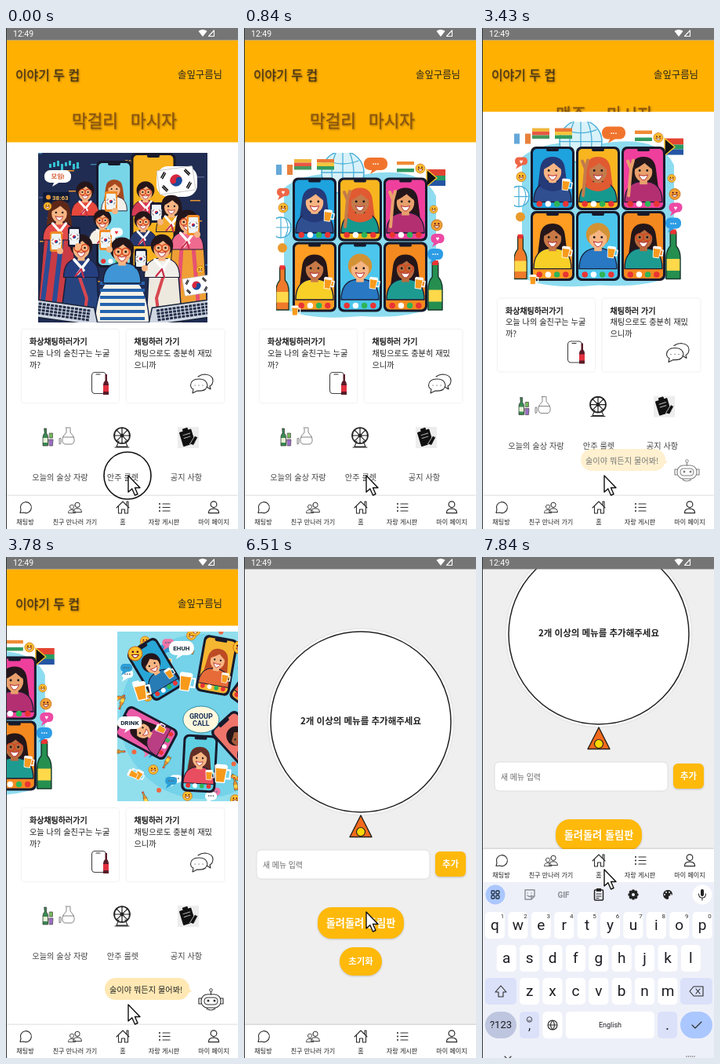
An HTML page that plays this animation: 296x638 px, repeating every 8000 ms.

```html
<!DOCTYPE html>
<html lang="ko">
<head>
<meta charset="utf-8">
<style>
html, body { margin: 0; width: 100%; height: 100%; overflow: hidden; background: #fff; }
svg { display: block; }
text { font-family: "Noto Sans CJK KR", "Noto Sans CJK", sans-serif; white-space: pre; stroke-width: 0; }
.roboto, .roboto text { font-family: Roboto, sans-serif; }
.b { font-weight: 700; }
.md { stroke-width: .35; }
.m { text-anchor: middle; }
.soft { filter: drop-shadow(0 1px 1px #0003); }
.faint { filter: drop-shadow(0 0 1px #0002); }
.ink { filter: drop-shadow(1px 1px 1px #0005); }
.line { fill: none; stroke: #2c2c2c; stroke-width: 1.1; stroke-linecap: round; stroke-linejoin: round; }
</style>
</head>
<body>
<svg id="stage" width="100%" height="100%" viewBox="0 0 296 638"></svg>
<script>
const LOOP = 8000, STATUS = 15.5;

// --- drawing helpers -------------------------------------------------------
const rect = (x, y, w, h, fill, r = 0, more = '') =>
  `<rect x="${x}" y="${y}" width="${w}" height="${h}" rx="${r}" fill="${fill}" ${more}/>`;
const circle = (x, y, r, fill, more = '') => `<circle cx="${x}" cy="${y}" r="${r}" fill="${fill}" ${more}/>`;
const path = (d, fill = 'none', stroke = 'none', w = 1) =>
  `<path d="${d}" fill="${fill}" stroke="${stroke}" stroke-width="${w}" stroke-linejoin="round" stroke-linecap="round"/>`;
const line = d => `<path class="line" d="${d}"/>`;
const text = (x, y, s, size, fill = '#222', cls = '') =>
  `<text x="${x}" y="${y}" font-size="${size}" fill="${fill}" stroke="${fill}" class="${cls}">${s}</text>`;
const group = (x, y, body, turn = 0, scale = 1) =>
  `<g transform="translate(${x} ${y}) rotate(${turn}) scale(${scale})">${body}</g>`;
const layer = (id, body) => `<g id="${id}">${body}</g>`;
const each = (n, f) => Array.from({ length: n }, (_, i) => f(i)).join('');

// --- picture parts ---------------------------------------------------------
function person(x, y, scale, { skin = '#f6b583', hair = '#24161a', top = '#e8455a', long = 0, scarf, glasses, hanbok }) {
  const cover = scarf || hair;
  return group(x, y,
    (long || scarf ? path('M-10-1Q-9-11 0-11Q9-11 10-1L12 15H-12Z', cover) : circle(0, -2, 9.5, cover)) +
    path('M-15 25Q-15 11-4 9H4Q15 11 15 25Z', top, '#1b1b33', .8) +
    rect(-3, 5, 6, 6, skin) +
    (hanbok ? path('M-6 10L2 19M6 10L-3 22', 'none', '#fff', 2.4) + path('M0 18L2 25M0 18L-5 24', 'none', '#c72f48', 1.5) : '') +
    (scarf ? path('M-9 5Q0 15 9 5L10 13Q0 20-10 13Z', scarf) : '') +
    `<ellipse cy="1" rx="7" ry="8" fill="${skin}"/>` +
    path('M-7-1Q-5-9 0-8Q6-9 7-1Q3-4 1-6Q-3-3-7-1', cover) +
    circle(-3, 0, .9, '#1b1b1b') + circle(3, 0, .9, '#1b1b1b') +
    path('M-3.500 3.500Q0 5 3.500 3.500Q2 7.500 0 7.500Q-2 7.500-3.500 3.500', '#fff', '#b32a30', .6) +
    (glasses ? path('M-6 0a3 3 0 106 0a3 3 0 10-6 0M0 0a3 3 0 106 0a3 3 0 10-6 0', 'none', '#d6451f', 1) : ''),
    0, scale);
}
const phone = (x, y, w, h, turn, screen, body = '') => group(x, y,
  rect(-w / 2, -h / 2, w, h, '#171a2c', 7) + rect(-w / 2 + 3, -h / 2 + 3, w - 6, h - 6, screen, 5) + body +
  rect(-8, -h / 2 + 2, 16, 4, '#171a2c', 2) +
  ['#e93434', '#fff', '#2fb457', '#e93434'].map((c, i) => circle((i - 1.5) * w / 5, h / 2 - 8, w / 15, c)).join(''), turn);
const emoji = (x, y, r, fill = '#ffc02e') => group(x, y,
  circle(0, 0, 6, fill, 'stroke="#c46a12" stroke-width=".7"') + circle(-2, -1.5, .9, '#502') + circle(2, -1.5, .9, '#502') +
  path('M-3 1Q0 6 3 1Z', '#fff', '#802010', .7), 0, r / 6);
const bottle = (x, y, fill, turn = 0, scale = 1) => group(x, y,
  path('M-2.500-20H2.500V-8Q6-4 6 2V20H-6V2Q-6-4-2.500-8Z', fill, '#193a2b', 1) + rect(-5.5, 3, 11, 10, '#ffd94a') +
  rect(-2.5, -22, 5, 4, '#e33'), turn, scale);
const mug = (x, y, turn = 0, scale = 1) => group(x, y,
  path('M6-5H11V5H6', 'none', '#fff', 2) + path('M-7-9H7L5 10H-5Z', '#f79a1c', '#fff', 1.2) +
  rect(-7, -11, 14, 5, '#fff', 2), turn, scale);
const bubble = (x, y, w, h, fill, label = '', ink = '#123') =>
  path(`M${x - 4} ${y + h / 2 - 2}l-3 7l10-6Z`, fill) + rect(x - w / 2, y - h / 2, w, h, fill, h / 2.2) +
  text(x, y + 3, label, 8, ink, 'roboto b m');
const koreaFlag = (x, y, w, turn = 0) => group(x, y,
  rect(-15, -10, 30, 20, '#fff', 1, 'stroke="#bbb" stroke-width=".5"') +
  path('M-5 0A5 5 0 015 0Z', '#d6283f') + path('M-5 0A5 5 0 005 0Z', '#1b4b9b') +
  circle(-2.5, 0, 2.5, '#d6283f') + circle(2.5, 0, 2.5, '#1b4b9b') +
  path('M-12-4l3-4M-11-3l3-4M9-8l3 4M8-7l3 4M-12 4l3 4M-11 3l3 4M9 8l3-4M8 7l3-4', 'none', '#111', 1), turn, w / 30);
const stripes = (x, y, colors, down) =>
  colors.map((c, i) => down ? rect(x, y + i * 4.5, 22, 4.5, c) : rect(x + i * 7, y, 7, 13, c)).join('');
const laptop = (x, y, turn) => group(x, y,
  path('M-38 0H38L46 22H-46Z', '#cfd6e2', '#182338', 1.5) +
  each(4, r => each(13, i => rect(-33 + i * 5.2, 3 + r * 4, 4, 3, '#25304a', .6))), turn);

function partyPicture() {
  const crowd = [
    [60, 50, 1.2, { top: '#e7483c', glasses: 1, hanbok: 1 }], [97, 46, 1.1, { top: '#f3f0ea', hair: '#a6481d', long: 1 }],
    [137, 50, 1.2, { top: '#d83b54', glasses: 1, hanbok: 1 }], [170, 68, 1.3, { top: '#f2a928', long: 1, hanbok: 1 }],
    [27, 76, 1.4, { top: '#e34a48', hair: '#5d2818', long: 1, hanbok: 1 }],
    [190, 88, 1.4, { top: '#ef6a8f', glasses: 1, long: 1, hanbok: 1 }],
    [82, 86, 1.2, { top: '#f4f0e4', glasses: 1, hanbok: 1 }], [134, 88, 1.2, { top: '#27386d', glasses: 1, hanbok: 1 }],
    [55, 121, 1.5, { top: '#263f80', glasses: 1, hanbok: 1 }], [158, 121, 1.5, { top: '#f0eee8', glasses: 1, hanbok: 1 }],
    [107, 126, 1.6, { top: '#3f95d5', glasses: 1 }],
  ];
  return rect(0, 0, 216, 216, '#202c52') +
    each(60, i => rect(i * 83 % 212, i * 47 % 205, 5 + i % 4 * 4, 1.5, ['#3d7fa8', '#e89430', '#53608d'][i % 3])) +
    each(8, i => rect(14 + i * 5, 14 - i % 3 * 2, 3, 5 + i % 4, '#35c2d2')) +
    text(110, 14, 'C0500', 8, '#ffb13b', 'roboto b') +
    rect(6, 50, 34, 13, '#101b38', 2) + circle(13, 56.5, 3, '#f19a31') + text(18, 60, '38:63', 8, '#ffc05a', 'roboto b') +
    bubble(25, 30, 34, 16, '#fff', '모임!', '#d5532b') +
    circle(93, 25, 12, 'none', 'stroke="#f28d2b" stroke-width="3" stroke-dasharray="3 1.500"') + rect(86, 20, 14, 10, '#f7c783', 2) +
    phone(97, 78, 46, 136, 0, '#78d5e8') + phone(147, 75, 57, 150, 0, '#f8b21e') +
    rect(151, 17, 52, 39, '#fff', 15) + koreaFlag(176, 35, 46, -8) +
    path('M0 200L8 105L42 100L54 200Z', '#c93b45', '#1b2039') + path('M163 205L172 112L211 115L216 205Z', '#ef9f35', '#1b2039') +
    path('M30 110L20 196M16 110L5 196', 'none', '#2a4c95', 6) + path('M198 120L205 200M183 120L178 200', 'none', '#e75271', 5) +
    crowd.slice(0, 8).map(p => person(...p)).join('') +
    path('M28 216L36 154Q55 142 75 156L78 216Z', '#27447f', '#141e3d', 1.5) + path('M138 216L141 154Q158 142 179 156L184 216Z', '#eee9df', '#141e3d', 1.5) +
    path('M52 156L62 185L58 216M160 156L151 185L155 216', 'none', '#d84750', 4) +
    path('M72 216Q76 155 107 155Q138 155 142 216Z', '#f6f2e8', '#1b2b5b', 1.5) +
    each(6, i => rect(79, 164 + i * 9, 57, 4, '#2563ae')) +
    crowd.slice(8).map(p => person(...p)).join('') +
    [[93, 62], [151, 76], [198, 92], [46, 107], [86, 111], [131, 135], [23, 113]].map(([x, y], i) =>
      rect(x - 8, y - 13, 16, 26, i % 2 ? '#171d35' : '#f08b27', 3) + rect(x - 6, y - 10, 12, 20, '#eef5f7', 1) +
      koreaFlag(x, y, 13) + circle(x + 5, y + 12, 4, '#f6b583')).join('') +
    bubble(100, 101, 16, 11, '#fff', '♥', '#e33') + koreaFlag(202, 169, 33, -9) +
    laptop(34, 192, 8) + laptop(183, 192, -8) + emoji(12, 68, 5) + emoji(207, 149, 5);
}

function callPicture() {
  const calls = [
    ['#1ea3df', { scarf: '#253a78', top: '#2f4f91' }], ['#f8b51f', { scarf: '#e05a32', top: '#15998f', skin: '#c47b4c' }],
    ['#ef3f9c', { long: 1, top: '#b42f72', skin: '#e8a06c' }], ['#ff9d22', { long: 1, skin: '#c77846', top: '#f7cf27' }],
    ['#4cc6ec', { hair: '#d39335', top: '#2878c3' }], ['#f4891f', { long: 1, skin: '#b86a3d', top: '#1d9b91', glasses: 1 }],
  ];
  return rect(0, 0, 216, 216, '#fff') +
    path('M10 45Q40 20 110 28Q185 15 204 55V195Q170 212 108 208Q40 214 10 198Z', '#8edcf0') +
    circle(85, 25, 27, '#d9f2f9', 'stroke="#4ab0d8" stroke-width="1.500"') +
    path('M58 25H112M85-2V52M65 10Q85 18 105 10M76 0Q66 25 76 50M94 0Q104 25 94 50', 'none', '#4ab0d8', 1.3) +
    circle(6, 95, 13, '#fff', 'stroke="#4ab0d8" stroke-width="1.500"') + path('M-7 95H19M6 82V108M0 84Q-6 95 0 106M12 84Q18 95 12 106', 'none', '#4ab0d8', 1.2) +
    stripes(0, 15, ['#65a8d8', '#fff', '#e8813c']) + stripes(23, 8, ['#efb73d', '#e95643', '#48985d'], 1) +
    stripes(52, 8, ['#ea7638', '#f4c63c', '#319b62'], 1) + bubble(127, 14, 30, 16, '#f1742d', '•••', '#fff') +
    stripes(154, 11, ['#f08b35', '#fff', '#319b62'], 1) + emoji(184, 20, 6) +
    rect(192, 21, 24, 8, '#e34432') + rect(192, 29, 24, 6, '#2a9c62') + rect(192, 35, 24, 7, '#2456a4') +
    path('M192 21L205 32L192 43Z', '#111', '#f7c22d', 1.5) +
    calls.map(([color, look], i) => phone(49 + i % 3 * 58, i < 3 ? 72 : 158, 56, i < 3 ? 81 : 89, 0, color,
      person(0, i < 3 ? -10 : -11, 1.6, look) + (i == 1 || i == 2
        ? path('M-19 22L-16-12M-16-12l-4-10M-16-12l3-11', 'none', look.skin, 4) : mug(17, 8, 8, .7)))).join('') +
    bottle(8, 173, '#ef7a2b', 0, 1.35) + bottle(203, 170, '#258f50', 0, 1.5) + mug(24, 201, 0, .6) +
    emoji(9, 70, 6) + emoji(205, 92, 7, '#f2a336') + circle(8, 121, 6, '#e99a2d') +
    bubble(206, 109, 17, 12, '#ed4aa4', '♥', '#fff') + bubble(203, 129, 20, 14, '#2d9de5', '•••', '#fff') +
    emoji(201, 72, 5) + bubble(9, 50, 16, 10, '#ee6646', '♥', '#fff');
}

function circlePicture() {
  const ring = [
    [48, 48, -31, '#28a6d6', { top: '#287cb5' }], [127, 43, 10, '#f5b631', { long: 1, hair: '#bd4b24', top: '#e66b38' }],
    [180, 65, 36, '#f3a139', { skin: '#87482d', top: '#ef5b45' }], [37, 129, -62, '#eb5aa7', { long: 1, top: '#ba3e83' }],
    [105, 168, 3, '#5ed0e2', { long: 1, hair: '#642f26', top: '#e94e60' }], [158, 140, -42, '#ef756b', { skin: '#a75d3b', top: '#287bb1' }],
  ];
  const bits = each(90, i => {
    const a = i * 2.4, r = 72 + i * 37 % 58, x = 108 + Math.cos(a) * r, y = 109 + Math.sin(a) * r;
    return [emoji(x, y, 6), mug(x, y, i * 31, .6), bubble(x, y, 15, 10, ['#fff', '#2b9ed7', '#ef74a6'][i % 3], '•••', '#567'),
      circle(x, y, 3, '#ef6841'), bottle(x, y, '#eb9130', i * 50, .4)][i % 5];
  });
  return rect(0, 0, 216, 216, '#91deed') + circle(108, 108, 105, '#74d2e9') + bits +
    ring.map(([x, y, turn, color, look]) => phone(x, y, 44, 73, turn, color, person(0, -7, 1.3, look) + mug(13, 14, 0, .6))).join('') +
    `<ellipse cx="107" cy="112" rx="23" ry="17" fill="#fff8dd" stroke="#2a8ba7"/>` +
    text(107, 111, 'GROUP', 9, '#162f58', 'roboto b m') + text(107, 120, 'CALL', 9, '#162f58', 'roboto b m') +
    bubble(82, 21, 32, 18, '#fff', 'EHUH') + bubble(16, 116, 31, 16, '#fff', 'DRINK') + bubble(198, 101, 28, 17, '#fff', 'FUN.') +
    mug(30, 76, -12, 1.1) + mug(87, 64, 8, 1.1) + mug(170, 107, 4, 1.1) + mug(132, 181, 5, 1.1) +
    emoji(23, 28, 9) + emoji(156, 20, 8) + emoji(189, 127, 8) + emoji(194, 145, 8, '#ef6da4');
}

// --- app parts -------------------------------------------------------------
const picture = (i, body) => `<svg x="${41 + i * 296}" y="159" width="216" height="216" viewBox="0 0 216 216">${body}</svg>`;
const card = (x, w, title, first, second) => rect(x, 384, w, 93, '#fff', 3, 'class="faint"') +
  text(x + 10, 403, title, 10, '#111', 'md') + text(x + 10, 417.5, first, 10.2) + text(x + 10, 432.5, second, 10.2);
const spokes = each(8, i => group(148, 519, path('M0-2V-9', 'none', '#222', 1.2) + circle(0, -9.5, 1, '#222'), i * 45));

const homeContent = layer('slides', picture(0, partyPicture()) + picture(1, callPicture()) + picture(2, circlePicture())) +
  card(20, 124, '화상채팅하러가기', '오늘 나의 술친구는 누굴', '까?') +
  card(153.5, 125, '채팅하러 가기', '채팅으로도 충분히 재밌', '으니까') +
  rect(109.5, 438.5, 18, 27, '#fff', 4, 'stroke="#444" stroke-width="1.100"') + line('M115 441h5') +
  path('M126.500 441h2.500v8q2 2 2 5v13h-7v-13q0-3 2.500-5Z', '#5a1c29') + rect(124, 455, 7, 8, '#e2303f') +
  line('M245 444Q249 441 254 441Q264 442 264 449Q264 454 260 456L261 460L256 457') +
  line('M246 447Q236 447 235.500 455Q236 459 239 460L238 465L244 462Q256 463 257 455Q256 447 246 447M241 455h.1M246 455h.1M251 455h.1') +
  path('M49 510h2.500v6q2 2 2 5v11h-6.500v-11q0-3 2-5Z', '#3a8a52', '#2c2c2c', .7) + rect(47.5, 522, 5.5, 6, '#e8f0d5') +
  path('M55 524h5l-.500 8h-4Z', '#9b6cc4', '#444', .7) + path('M55.500 516h4v6h-4Z', '#74b957', '#444', .7) +
  path('M76 509h6M77 510v5l-4 5q-3 8 2 10h9q5-2 2-10l-4-5v-5M73 521h13M70 523v6l-2 1v-7Z', 'none', '#777', .9) +
  circle(148, 519, 10, 'none', 'stroke="#222" stroke-width="1.700"') + spokes + circle(148, 519, 2.5, '#222') +
  line('M144 526l-3 7h14l-3-7M139 534h18') +
  rect(219, 508, 27, 27, '#ededed') + group(232, 521, rect(-9, -9, 16, 19, '#111', 1) + rect(-4, -12, 7, 4, '#111', 1) +
    path('M-5-4H4M-5 0H3', 'none', '#bbb', 1) + path('M0 9L9 1L12 4L4 12Z', '#111', '#eee', .7), -17) +
  text(69, 575.5, '오늘의 술상 자랑', 10.2, '#444', 'm') + text(149, 575.5, '안주 룰렛', 10.2, '#444', 'm') + text(230, 575.5, '공지 사항', 10.2, '#444', 'm');

const robot = rect(126, 536, 108, 28, '#ffe8b3', 14) + path('M226 543L237 553L227 558Z', '#ffe8b3') +
  text(132, 554.5, '술이야 뭐든지 물어봐!', 10.2) +
  rect(249, 557, 25, 17, '#fff', 8, 'class="line" style="fill:#fff"') + rect(253, 561, 17, 9, '#fff', 4, 'stroke="#333"') +
  circle(258, 565, 1.5, '#333') + circle(266, 565, 1.5, '#333') + line('M261.500 557v-4M249 562h-3v7h3M274 562h3v7h-3M256 575q5 4 11 0') +
  circle(261.5, 551.5, 1.8, '#fff', 'stroke="#333"');

const drinkText = (x, s) => text(x, 126, s, 21.3, '#8a5611', 'md m ink');
const header = `<clipPath id="headClip"><rect id="headMask" width="296" height="145"/></clipPath>` +
  `<rect id="headFill" y="${STATUS}" width="296" height="130" fill="#ffb000"/>` +
  text(12, 66, '이야기 두 컵', 15.9, '#4a3518', 'md ink') + text(219, 64, '솔잎구름님', 12.4) +
  `<g clip-path="url(#headClip)">` + layer('slogan',
    layer('drinkOld', drinkText(113.5, '막걸리')) + layer('drinkNew', drinkText(113.5, '맥주')) + drinkText(188.5, '마시자')) + '</g>';

const yellowButton = (x, y, w, h, r, label, size) => rect(x, y, w, h, '#ffb90a', r, 'class="soft"') +
  text(x + w / 2, y + h / 2 + size * .36, label, size, '#fff', 'b m');
const wheelPage = circle(149, 210, 118, '#fff', 'class="faint"') + circle(149, 210, 115, '#fff', 'stroke="#222" stroke-width="1.500"') +
  text(149, 213, '2개 이상의 메뉴를 추가해주세요', 11.5, '#222', 'b m') +
  path('M149 329L163 356.500H135Z', '#f26a1b', '#26201c', 1.4) + circle(149, 350, 5.5, '#ffd600', 'stroke="#222" stroke-width="1.200"') +
  rect(16, 373, 221, 37, '#fff', 6, 'stroke="#ddd"') + text(24, 395.5, '새 메뉴 입력', 9.9, '#666') +
  layer('caret', rect(24.5, 383, 1.2, 17, '#222')) +
  yellowButton(244, 375, 39, 32, 6, '추가', 11.4) + yellowButton(94, 446, 110, 40, 18, '돌려돌려 돌림판', 13.2) +
  yellowButton(122, 497, 54, 36, 18, '초기화', 11.4);

const user = (x, y, s) => group(x, y, line('M-3.500-3a3.500 3.500 0 107 0a3.500 3.500 0 10-7 0M-6 7q0-5 6-5t6 5Z'), 0, s);
const nav = rect(0, 596, 296, 42, '#fff', 0, 'style="filter:drop-shadow(0 -1px 1px #0002)"') +
  line('M18 617.500l1-4A7 7 0 1122.500 617Z') + user(91, 610, .9) + user(84, 612, .75) +
  line('M141 611L149 603L157 611M143.500 609v9h4v-5h4v5h4v-9M154 607v-4h2v6') +
  each(3, i => circle(196, 606 + i * 4.5, 1, '#222') + line(`M200 ${606 + i * 4.5}h9`)) + user(265, 610, 1.1) +
  [[24.5, '채팅방'], [88, '친구 만나러 가기'], [149, '홈'], [201.5, '자랑 게시판'], [265, '마이 페이지']]
    .map(([x, s]) => text(x, 632, s, 8.1, '#222', 'm')).join('');

// --- keyboard --------------------------------------------------------------
const key = (x, y, w, label = '', fill = '#fff', r = 5, size = 19) =>
  rect(x, y, w, 34, fill, r) + text(x + w / 2, y + 17 + size * .33, label, size, '#1b1c22', 'm');
const keyRow = (letters, x, y) => [...letters].map((c, i) => key(x + i * 29.4, y, 25, c)).join('');
const globe = line('M84 596a6 6 0 1012 0a6 6 0 10-12 0M84 596h12M90 590q-5 6 0 12M90 590q5 6 0 12');
const keyboard = `<g class="roboto">` + rect(0, 414, 296, 224, '#eef0f9') +
  circle(17, 430, 12.5, '#abc7ff') + each(4, i => rect(12 + i % 2 * 6, 425 + (i >> 1) * 6, 4, 4, 'none', 1, 'stroke="#234" stroke-width="1.300"')) +
  path('M55 424h12v8l-4 4h-8ZM67 432h-4v4M58 428h.1M63 428h.1M58 431q3 3 5 0', 'none', '#8b8d95', 1.4) +
  text(104, 433.5, 'GIF', 10, '#8b8d95', 'b m') +
  rect(143.5, 424, 11, 13, 'none', 1, 'stroke="#222" stroke-width="1.500"') + rect(146, 422, 6, 4, '#222') + line('M146 429h6M146 432h6M146 434.500h3') +
  each(4, i => group(193, 430, rect(-1.8, -6.5, 3.6, 13, '#222', 1), i * 45)) + circle(193, 430, 4.8, '#222') + circle(193, 430, 2, '#eef0f9') +
  path('M237 424a6 6 0 100 12q2-1 1-3q0-2 3-2q2 0 2-2q-1-5-6-5Z', '#222') + [[233, 430], [235, 427], [239, 427], [241, 430]].map(([x, y]) => circle(x, y, 1, '#eef0f9')).join('') +
  circle(281, 430, 12.5, '#fff') + rect(279, 423, 4, 9, '#222', 2) + line('M276.500 429q0 5 4.500 5t4.500-5M281 434v3') +
  keyRow('qwertyuiop', 4, 452) + [...'1234567890'].map((c, i) => text(26 + i * 29.4, 460, c, 8, '#333', 'm')).join('') +
  keyRow('asdfghjkl', 18.7, 494) + key(4, 536, 40, '', '#dbe1f9') + keyRow('zxcvbnm', 48.1, 536) + key(253, 536, 41, '', '#dbe1f9') +
  line('M24 546l-7 8h4v6h6v-6h4Z') + line('M265 553l5-6h12v12h-12ZM273 550l5 6M278 550l-5 6') +
  key(4, 579, 40, '?123', '#bec6df', 17, 13) + key(48, 579, 25, '', '#dbe1f9') + text(60.5, 602, ',', 16, '#222', 'm') +
  circle(60.5, 589, 3.3, 'none', 'stroke="#222" stroke-width=".8"') + path('M59 590q1.500 2 3 0', 'none', '#222', .8) +
  key(77.5, 579, 25) + globe + key(107, 579, 113, 'English', '#fff', 5, 9) + key(224, 579, 25, '.', '#dbe1f9') +
  key(253, 579, 41, '', '#abc7ff', 17) + line('M268 596l4 4l8-8') +
  line('M29 636l4 4l4-4') + each(5, i => circle(261 + i * 2.5, 636, .7, '#555')) + '</g>';

const status = rect(0, 0, 296, STATUS, '#757575') + text(9, 10.8, '12:49', 10.5, '#fff', 'roboto') +
  path('M245.500 4Q251 0 256.500 4L251 11Z', '#fff') + path('M258.500 10.500L265.500 3V10.500Z', 'none', '#fff', 1.1);
const pointer = `<circle id="ring" cx="-1" cy="0" r="30" fill="none" stroke="#111" stroke-width="1.600"/>` +
  path('M0 0V21L4.800 16.800L8.500 25L12 23.500L8.500 15.500H15Z', '#fff', '#111', 1.4);

document.getElementById('stage').innerHTML = rect(0, 0, 296, 638, '#fff') +
  layer('content', homeContent) + layer('robot', robot) + header +
  layer('wheel', rect(0, 15, 296, 623, '#efefef') + layer('wheelBody', wheelPage)) +
  layer('nav', nav) + layer('keyboard', keyboard) + status + rect(0, 0, 1, 638, '#35383d') + layer('pointer', pointer);

// --- motion ----------------------------------------------------------------
const $ = id => document.getElementById(id);
const progress = (t, a, b) => Math.min(1, Math.max(0, (t - a) / (b - a)));
const easeInOut = p => p < .5 ? 4 * p ** 3 : 1 - 4 * (1 - p) ** 3;
const smooth = p => p * p * (3 - 2 * p);
const move = (id, x, y) => $(id).setAttribute('transform', `translate(${x} ${y})`);
const fade = (id, v) => { $(id).style.opacity = v; };
const between = (t, a, b) => t >= a && t < b ? 1 : 0;
const pointerKeys = [[4230, 156, 570], [4560, 187, 500], [4760, 180, 465], [5000, 180, 465], [5260, 169, 500],
  [5530, 156, 452], [6510, 156, 452], [6790, 171, 464], [7140, 156, 398]];

function pointerAt(t) {
  const i = pointerKeys.findIndex(k => k[0] > t);
  if (i < 1) return (i ? pointerKeys.at(-1) : pointerKeys[0]).slice(1);
  const [a, x, y] = pointerKeys[i - 1], [b, u, v] = pointerKeys[i], p = smooth(progress(t, a, b));
  return [x + (u - x) * p, y + (v - y) * p];
}

function draw(now) {
  const t = now % LOOP;
  const swap = progress(t, 960, 1190), collapse = progress(t, 3320, 3500);
  const headBottom = STATUS + 130 - 8 * swap - 50 * collapse;
  move('slides', -296 * (easeInOut(progress(t, 320, 820)) + easeInOut(progress(t, 3515, 3990))), 0);
  move('content', 0, -64 * collapse);
  $('headFill').setAttribute('height', headBottom - STATUS);
  $('headMask').setAttribute('height', headBottom);
  move('slogan', 0, -8 * swap);
  fade('drinkOld', 1 - swap);
  fade('drinkNew', swap);
  fade('robot', collapse);

  const rise = smooth(progress(t, 7380, 7630));
  fade('wheel', progress(t, 6100, 6300));
  move('wheelBody', 0, -112 * rise);
  move('nav', 0, -224 * rise);
  move('keyboard', 0, 224 * (1 - rise));
  fade('caret', between(t, 7280, 7840));

  move('pointer', ...pointerAt(t));
  fade('ring', between(t, 0, 350) || between(t, 5950, 6160) || between(t, 7140, 7280));
}

const start = performance.now();
function tick() {
  draw(performance.now() - start);
  requestAnimationFrame(tick);
}
tick();
</script>
</body>
</html>
```
